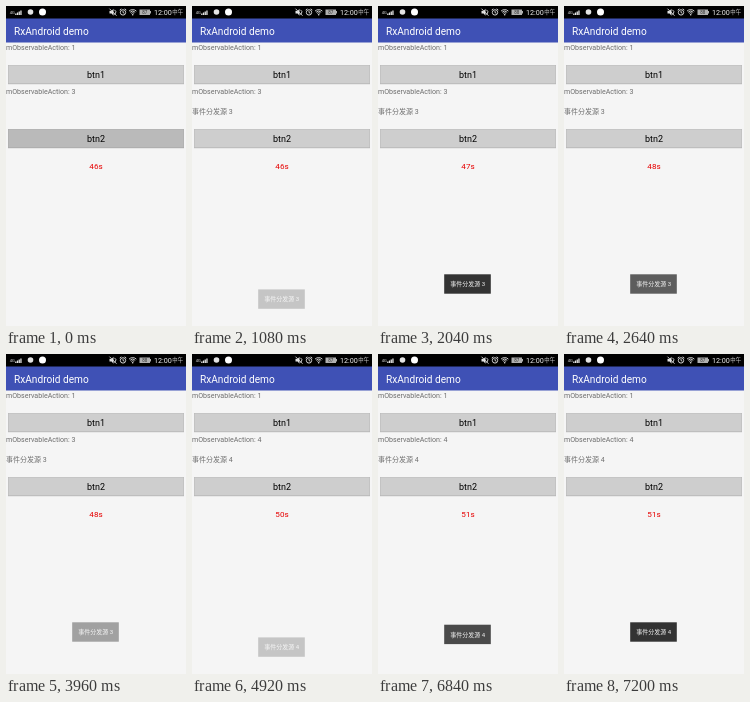
Animation, 180 px wide and 320 px high, one loop 7.32 s. Source, as an HTML page with a canvas:

```html
<!DOCTYPE html>
<html lang="zh">
<head>
<meta charset="utf-8">
<title>RxAndroid demo</title>
<style>
html, body { margin: 0; width: 100%; height: 100%; overflow: hidden; background: #f5f5f5; }
canvas { display: block; width: 180px; height: 320px; }
</style>
</head>
<body>
<canvas id="stage"></canvas>
<script>
const W = 180, H = 320, LOOP = 7320, STEP = 120;
const FONT = 'Roboto, "Noto Sans CJK SC", "Noto Sans CJK", sans-serif';
const GRAY = '#6e6e6e', ICON = '#e4e4e4';
const canvas = document.getElementById('stage');
const ctx = canvas.getContext('2d');
const ratio = window.devicePixelRatio || 1;
canvas.width = W * ratio;
canvas.height = H * ratio;
ctx.scale(ratio, ratio);

const ticks = [1920, 2400, 4680, 4920, 6720];
const stalls = [[2640, 840], [3600, 360], [4920, 840], [5760, 360], [6120, 480]];

// Toast times run on the clock without stalls.
const RISE = 1140, LEAD = 180, FADE = 1260;
const toasts = [
  { label: '事件分发源 3', start: 1080, leave: 2100 },
  { label: '事件分发源 4', start: 3960, leave: LOOP }
];

const clamp = v => Math.max(0, Math.min(1, v));

// Each stall shows a single step, however long it lasts.
function playedTime(t) {
  const lost = stalls.reduce((sum, [from, length]) =>
    sum + Math.max(0, Math.min(t - from, length - STEP)), 0);
  return t - lost;
}

function rect(x, y, w, h, color) {
  ctx.fillStyle = color;
  ctx.fillRect(x, y, w, h);
}

function text(str, x, y, size, color, align = 'left') {
  ctx.font = `${size}px ${FONT}`;
  ctx.textAlign = align;
  ctx.fillStyle = color;
  ctx.fillText(str, x, y);
}

function dot(x, y, r, color) {
  ctx.fillStyle = color;
  ctx.beginPath();
  ctx.arc(x, y, r, 0, Math.PI * 2);
  ctx.fill();
}

function line(...points) {
  ctx.beginPath();
  points.forEach(([x, y]) => ctx.lineTo(x, y));
  ctx.stroke();
}

function arc(x, y, r, from, to) {
  ctx.beginPath();
  ctx.arc(x, y, r, from, to);
  ctx.stroke();
}

function muteIcon(x, y) {
  rect(x - 3.5, y - 1.3, 2, 2.6, ICON);
  ctx.beginPath();
  ctx.moveTo(x - 2.5, y);
  ctx.lineTo(x + .5, y - 3.5);
  ctx.lineTo(x + .5, y + 3.5);
  ctx.fill();
  line([x - 3.5, y - 3.5], [x + 3.5, y + 3.5]);
  arc(x, y, 2.8, -1, 1);
}

function alarmIcon(x, y) {
  arc(x, y, 2.7, 0, Math.PI * 2);
  line([x, y - 1.6], [x, y + .2], [x + 1.4, y + .8]);
  for (const side of [-1, 1]) line([x + side * 3.3, y - 2.3], [x + side * 1.7, y - 3.6]);
}

function wifiIcon(x, y) {
  for (const r of [2, 3.6, 5.2]) arc(x, y, r, -Math.PI * .75, -Math.PI * .25);
  dot(x, y, .8, ICON);
}

function statusBar(t) {
  rect(0, 0, W, 12.5, '#000');
  text('4G', 3.8, 8.3, 4, ICON);
  for (let i = 0; i < 4; i++) rect(9.2 + i * 1.7, 7.5 - i, 1.3, 1.5 + i, ICON);
  dot(24.5, 6, 2.8, ICON);
  dot(36.5, 6, 3.5, '#fff');

  ctx.strokeStyle = ICON;
  ctx.lineWidth = .9;
  muteIcon(107, 6.2);
  alarmIcon(117, 6.4);
  wifiIcon(126.7, 8.8);

  const level = t >= 2040 && t < 4680 ? 88 : 87;
  rect(133.5, 3.5, 10.5, 5.5, '#b0b0b0');
  rect(144, 5, 1, 2.5, '#b0b0b0');
  text(level, 138.7, 7.9, 4.5, '#333', 'center');

  text('12:00', 148, 8.8, 7.2, '#eee');
  text('中午', 166.3, 8.4, 5.4, '#ddd');
}

function button(label, y, pressed) {
  rect(2, y, 176, 19.2, pressed ? '#a8a8a8' : '#b4b4b4');
  rect(2.4, y + .3, 175.2, 18.1, pressed ? '#bababa' : '#cecece');
  text(label, 90, y + 13, 9, '#000', 'center');
}

function toast({ label, start, leave }, time) {
  if (time < start) return;
  const rise = Math.sin(Math.PI / 2 * clamp((time - start + LEAD) / RISE));
  const fade = Math.cos(Math.PI / 2 * clamp((time - leave) / FADE));
  const alpha = rise * fade;
  if (alpha < .01) return;
  const y = 288 - 20 * rise;
  ctx.globalAlpha = alpha;
  rect(66.2, y + .3, 46.6, 19.4, '#333');
  ctx.globalAlpha = 1;
  text(label, 89.7, y + 12.3, 6, '#f6f6f6', 'center');
}

function draw(t) {
  const clicked = t >= 4800 ? 4 : 3;
  const seconds = 46 + ticks.filter(tick => t >= tick).length;
  rect(0, 0, W, H, '#f5f5f5');
  rect(0, 12, W, 24.5, '#3f51b5');
  statusBar(t);
  text('RxAndroid demo', 8, 28.8, 10.15, '#fff');

  text('mObservableAction: 1', 0, 44.3, 7.1, GRAY);
  button('btn1', 59, false);
  text('mObservableAction: ' + clicked, 0, 88.3, 7.1, GRAY);
  if (t >= STEP) text('事件分发源 ' + clicked, 0, 108.2, 7, GRAY);
  button('btn2', 123, t < STEP);
  text(seconds + 's', 90, 163, 8.1, '#e60000', 'center');

  toasts.forEach(item => toast(item, playedTime(t)));
}

const start = performance.now();
function frame() {
  const t = (performance.now() - start) % LOOP;
  draw(Math.floor(t / STEP) * STEP);
  requestAnimationFrame(frame);
}
frame();
</script>
</body>
</html>
```
